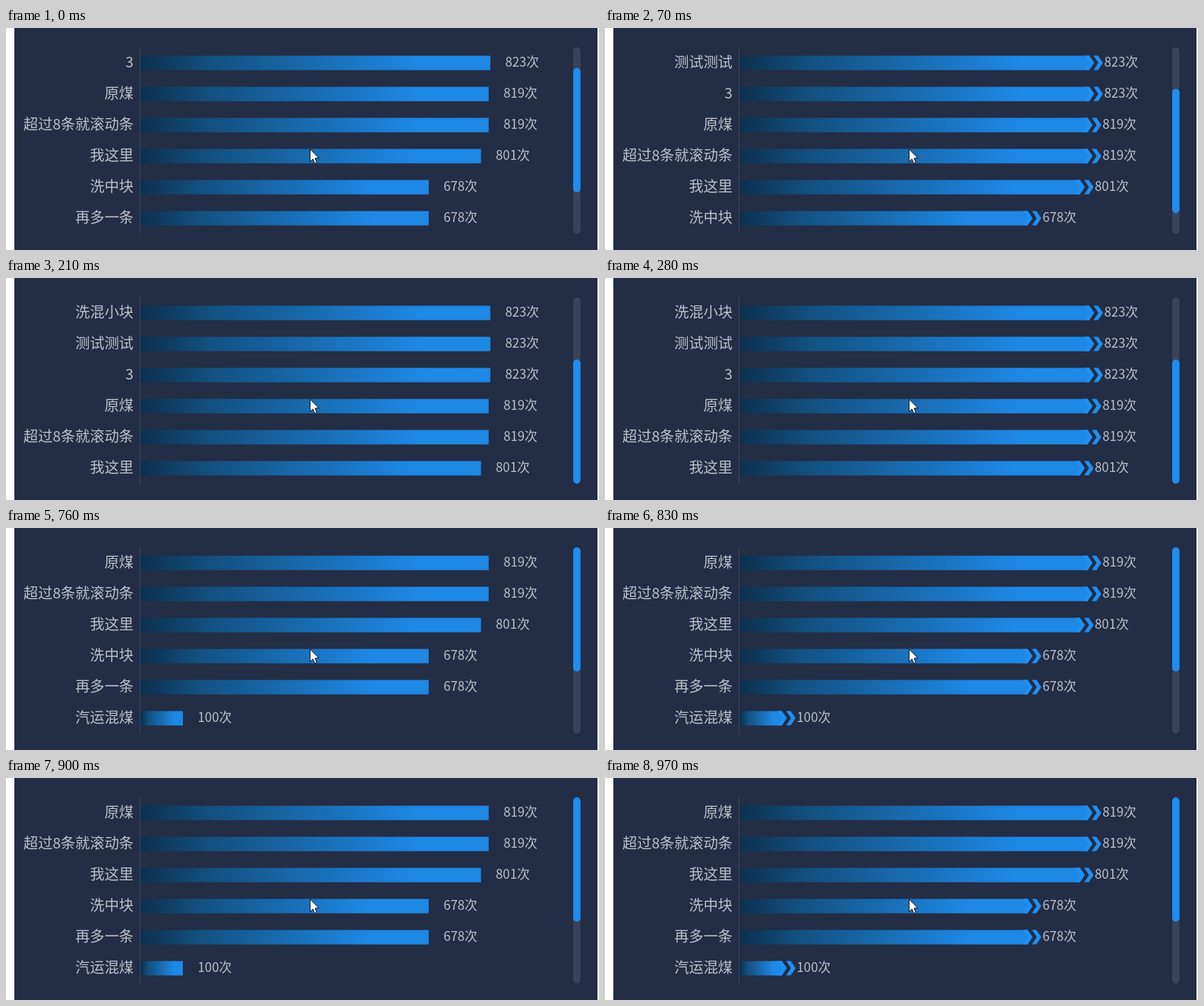
An HTML page with a canvas for the animation above (1.77 s loop, 781x293 px).

```html
<!DOCTYPE html>
<html lang="zh-CN">
<head>
<meta charset="utf-8">
<title>滚动条形图</title>
<style>
html, body { margin: 0; width: 100%; height: 100%; overflow: hidden; background: #fff; }
canvas { display: block; }
</style>
</head>
<body>
<canvas id="chart" width="781" height="293"></canvas>
<script>
const ctx = document.getElementById('chart').getContext('2d');
const FONT = '"Noto Sans CJK SC", "Noto Sans CJK", "Noto Sans", sans-serif';
const DATA = [
  ['洗混小块', 823], ['测试测试', 823], ['3', 823],
  ['原煤', 819], ['超过8条就滚动条', 819], ['我这里', 801],
  ['洗中块', 678], ['再多一条', 678], ['汽运混煤', 100]
];
const ROWS = 6, PITCH = 41, LEFT = 177, TOP = 25.5, TRACK = 246, LOOP = 1770;

// [start time, first visible row, arrowheads shown]
const STEPS = [
  [0, 2, false], [70, 1, true], [210, 0, false], [280, 0, true],
  [680, 2, false], [760, 3, false], [830, 3, true], [900, 3, false], [970, 3, true]
];

function polygon(x, y, points, color) {
  ctx.beginPath();
  for (const [dx, dy] of points) ctx.lineTo(x + dx, y + dy);
  ctx.closePath();
  ctx.fillStyle = color;
  ctx.fill();
}

function pill(y, height, color) {
  ctx.beginPath();
  ctx.roundRect(747, y, 9.6, height, 4.8);
  ctx.fillStyle = color;
  ctx.fill();
}

function text(str, x, y, size, align) {
  ctx.font = `${size}px ${FONT}`;
  ctx.textAlign = align;
  ctx.fillStyle = '#bdc1c9';
  ctx.fillText(str, x, y);
}

function drawRow([label, value], y, arrows) {
  const width = value * 0.56, end = LEFT + width;
  const fill = ctx.createLinearGradient(LEFT, 0, end, 0);
  fill.addColorStop(0, '#0c2f4e');
  fill.addColorStop(0.2, '#13507f');
  fill.addColorStop(0.8, '#1e88e5');
  fill.addColorStop(1, '#1e88e5');
  ctx.fillStyle = fill;
  ctx.fillRect(LEFT, y, width, 19);
  if (arrows) {
    polygon(end, y, [[-6, 0], [0, 0], [6.5, 9.5], [0, 19], [-6, 19], [0, 9.5]], '#1f90f3');
    polygon(end, y, [[5.5, 0], [11.5, 0], [18, 9.5], [11.5, 19], [5.5, 19], [12, 9.5]], '#1f90f3');
  }
  text(label, 168, y + 15.2, 19.2, 'right');
  text(value + '次', end + 19.5, y + 14.2, 16.8, 'left');
}

function drawCursor() {
  const shape = [[0, 0], [0, 16.5], [3.8, 13], [6.3, 18.7], [8.9, 17.5], [6.5, 12], [11.5, 11.6]];
  polygon(400.5, 160, shape, '#fff');
  ctx.strokeStyle = '#10151f';
  ctx.lineWidth = 1;
  ctx.stroke();
}

function draw(time) {
  const [, first, arrows] = STEPS.findLast(step => step[0] <= time);
  ctx.fillStyle = '#fff';
  ctx.fillRect(0, 0, 781, 293);
  ctx.fillStyle = '#232d45';
  ctx.fillRect(11, 0, 768, 293);
  ctx.fillStyle = '#3b445a';
  ctx.fillRect(176, TOP, 1, TRACK);
  DATA.slice(first, first + ROWS).forEach((row, i) => drawRow(row, 36.6 + i * PITCH, arrows));
  const unit = TRACK / DATA.length;
  pill(TOP, TRACK, '#3a4359');
  pill(TOP + (DATA.length - ROWS - first) * unit, ROWS * unit, '#1e8df0');
  drawCursor();
}

const start = performance.now();
function tick() {
  draw((performance.now() - start) % LOOP);
  requestAnimationFrame(tick);
}
tick();
</script>
</body>
</html>
```
